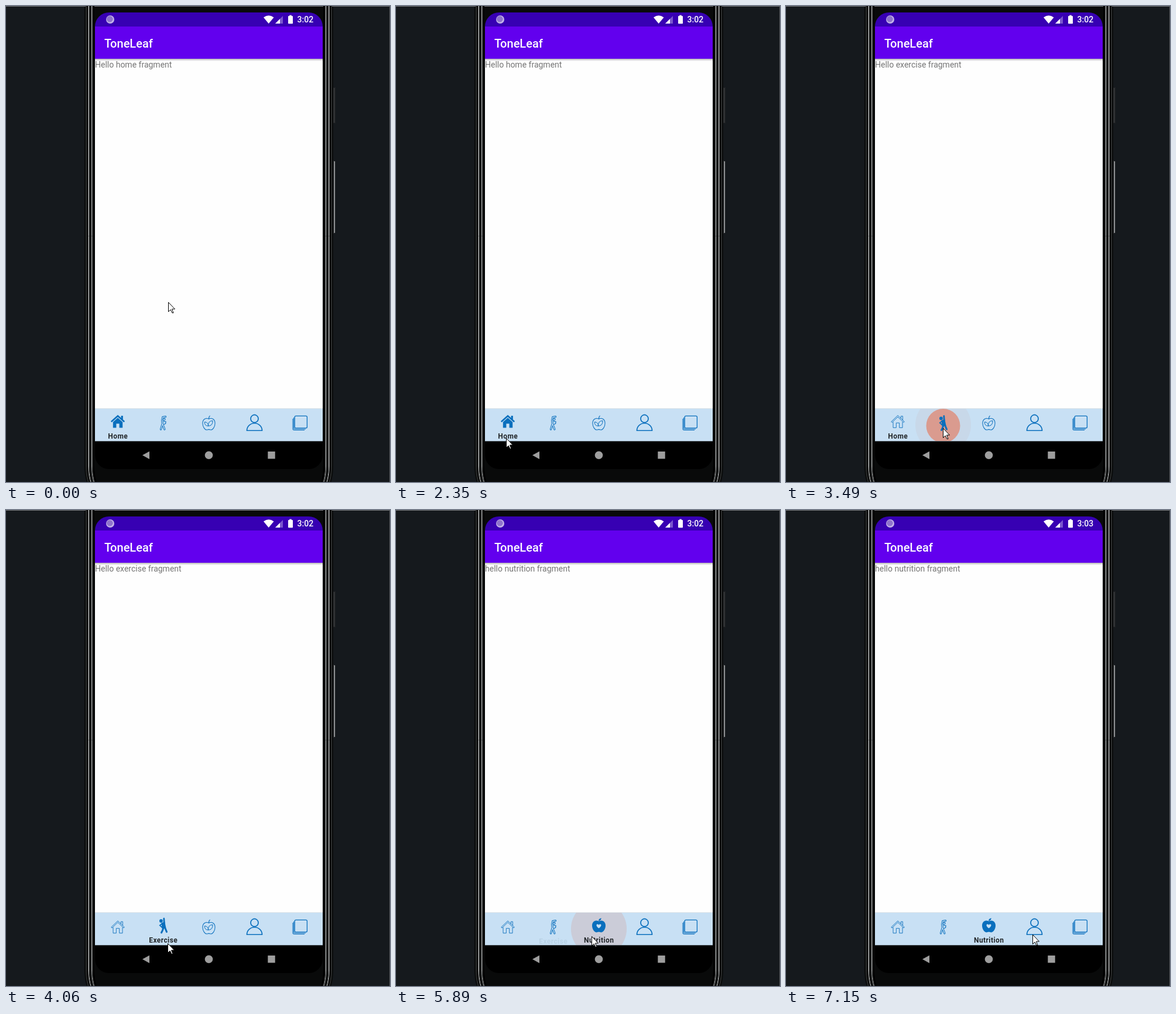
These frames come from a looping animation (656x812 px, 8 s). An HTML page with a canvas:

```html
<!DOCTYPE html>
<html lang="en">
<head>
<meta charset="utf-8">
<title>Bottom navigation</title>
<style>
html, body { margin: 0; width: 100%; height: 100%; overflow: hidden; background: #15191d; }
canvas { display: block; }
</style>
</head>
<body>
<canvas id="stage" width="656" height="812"></canvas>
<script>
const ctx = document.getElementById('stage').getContext('2d');
const LOOP = 8000;
const BLUE = '#0a6fbd', BAR = '#c8e0f4';
const TABS = [
  { x: 191, label: 'Home', text: 'Hello home fragment' },
  { x: 268.5, label: 'Exercise', text: 'Hello exercise fragment' },
  { x: 346.5, label: 'Nutrition', text: 'hello nutrition fragment' }
];
const CLICKS = [3490, 5740];
const CLOCK_TICK = 6170;

// Pointer moves: start, end, number of steps, first gap, path
const MOVES = [
  [540, 1340, 6, 160, [[271, 541], [205, 450], [167, 300], [172, 170], [200, 110], [226, 90]]],
  [1630, 1930, 3, 150, [[222, 260], [196, 600], [186, 737]]],
  [2350, 3210, 7, 120, [[188, 737], [268, 720]]],
  [3490, 4060, 5, 120, [[268, 720], [268, 720], [268, 723], [272, 732], [276, 739]]],
  [4920, 5460, 5, 140, [[282, 738], [334, 727]]],
  [5740, 6450, 6, 150, [[334, 727], [334, 727], [350, 730], [378, 736], [398, 742], [409, 744]]],
  [7030, 7150, 2, 120, [[414, 734], [421, 724]]]
];

function along(path, p) {
  const s = p * (path.length - 1);
  const i = Math.min(Math.floor(s), path.length - 2);
  const f = s - i;
  return [0, 1].map(k => Math.round(path[i][k] + (path[i + 1][k] - path[i][k]) * f));
}

function pointerAt(t) {
  let pos = [277, 505];
  for (const [start, end, n, gap, path] of MOVES) {
    if (t < start) break;
    const rest = (end - start - gap) / Math.max(1, n - 2);
    let k = 0;
    if (t >= start + gap) k = Math.min(n - 1, 1 + Math.floor((t - start - gap) / rest + 1e-6));
    pos = along(path, k / (n - 1));
  }
  return pos;
}

function rect(x, y, w, h, color) {
  ctx.fillStyle = color;
  ctx.fillRect(x, y, w, h);
}

function disc(x, y, r, color) {
  ctx.fillStyle = color;
  ctx.beginPath();
  ctx.arc(x, y, r, 0, 7);
  ctx.fill();
}

function poly(points, color) {
  ctx.fillStyle = color;
  ctx.beginPath();
  points.forEach(([x, y]) => ctx.lineTo(x, y));
  ctx.closePath();
  ctx.fill();
}

function stroke(d, color, width) {
  ctx.strokeStyle = color;
  ctx.lineWidth = width;
  ctx.stroke(new Path2D(d));
}

function fill(d, color) {
  ctx.fillStyle = color;
  ctx.fill(new Path2D(d));
}

function text(str, x, y, font, color, align = 'left', spacing = 0) {
  ctx.font = font + ' Roboto, sans-serif';
  ctx.fillStyle = color;
  ctx.textAlign = align;
  ctx.letterSpacing = spacing + 'px';
  ctx.fillText(str, x, y);
}

function at(x, y, draw) {
  ctx.save();
  ctx.translate(x, y);
  draw();
  ctx.restore();
}

function edge(x, color, width) {
  const side = `M${x} 0V785Q${x} 802 ${x + 5} 816`;
  stroke(side, color, width);
  ctx.save();
  ctx.translate(693, 0);
  ctx.scale(-1, 1);
  stroke(side, color, width);
  ctx.restore();
}

function drawPhone() {
  rect(0, 0, 656, 812, '#15191d');
  rect(0, 0, 656, 1, '#77797c');
  rect(655, 0, 1, 812, '#54575a');
  fill('M134 1H559V785Q559 802 554 816H139Q134 802 134 785Z', '#090a0a');
  edge(137, '#2b2d2d', 2);
  edge(139, '#050505', 2);
  edge(140.5, '#565858', 1);
  edge(141.5, '#cbcdcd', 1);
  edge(143.5, '#0c0d0d', 3);
  edge(145.5, '#363838', 1);
  edge(146.5, '#8e9090', 1);
  edge(147.5, '#585a5a', 1);
  edge(149.5, '#000', 3);
  rect(559, 139, 4, 61, '#222426');
  rect(560, 140, 1, 59, '#414345');
  rect(559, 264, 3, 124, '#2c2e30');
  rect(560, 265, 1, 122, '#5c5e60');
  rect(561, 265, 1, 122, '#b9bbbc');
}

function drawScreen(t, tab) {
  ctx.save();
  ctx.beginPath();
  ctx.roundRect(152, 11, 389, 779, 24);
  ctx.clip();
  rect(152, 11, 389, 24, '#3700b3');
  rect(152, 35, 389, 55, '#6200ee');
  rect(152, 90, 389, 597, '#fefefe');
  const shade = ctx.createLinearGradient(0, 90, 0, 94);
  shade.addColorStop(0, '#b4b4b4');
  shade.addColorStop(1, '#fefefe');
  rect(152, 90, 389, 4, shade);
  rect(152, 686, 389, 1, '#e2e6e9');
  rect(152, 742, 389, 48, '#000');
  rect(152, 687, 389, 55.4, BAR);
  drawStatus(t);
  text('ToneLeaf', 168, 71, '500 20px', '#fff');
  text(TABS[tab].text, 152, 105, '14px', '#757575');
  poly([[233, 766.3], [245, 759.8], [245, 773]], '#9e9e9e');
  disc(346.5, 766.3, 6.8, '#9e9e9e');
  rect(447.3, 760, 12.4, 12.4, '#9e9e9e');
  ctx.restore();
}

function drawStatus(t) {
  disc(178, 23, 7, '#c3b3e8');
  disc(177.3, 22.3, 5.3, '#8f74cc');
  fill('M440 19.6Q448.7 12.8 457.5 19.6L448.7 30Z', '#fff');
  poly([[460, 30], [473, 17], [473, 30]], '#7b58cd');
  poly([[460, 30], [468, 22], [468, 30]], '#fff');
  rect(484.2, 15.6, 3.6, 3, '#fff');
  ctx.fillStyle = '#fff';
  ctx.beginPath();
  ctx.roundRect(482, 17, 8, 13.3, 1);
  ctx.fill();
  text(t < CLOCK_TICK ? '3:02' : '3:03', 497.5, 28, '500 14px', '#fff');
}

function homeIcon(on) {
  if (on) {
    stroke('M-11.2 .2L0 -9.8L11.2 .2', BLUE, 2.6);
    rect(5.6, -10, 3.2, 6.5, BLUE);
    fill('M-8.2 .7L0 -6.6L8.2 .7V10.5H2.6V3.5H-2.6V10.5H-8.2Z', BLUE);
    return;
  }
  stroke('M-11.3 .2L0 -10.6L11.3 .2L10 1.5L0 -8L-10 1.5Z', BLUE, .9);
  stroke('M5.4 -5.5V-9.3H8.4V-2.8M-8 .5V10.3H-2.7V2.2H2.7V10.3H8V.5', BLUE, .9);
}

function exerciseIcon(on) {
  ctx.lineCap = 'round';
  if (on) {
    disc(-3.6, -8, 2.9, BLUE);
    stroke('M1.3 -12L1.8 -4', BLUE, 2.8);
    stroke('M-2 -3.4L-5.6 -.4L-2 3', BLUE, 1.9);
    fill('M-3 -4.6L2.7 -6.8L5 4.5L-1.8 5.4Z', BLUE);
    stroke('M.2 4.5L-1.2 8.5L-3 12', BLUE, 3);
    stroke('M3.3 4L6 10.6', BLUE, 3);
    return;
  }
  const limbs = 'M4 -10.8L-.6 -10L-1.8 -5L-1.2 1L-4 10.6M-1 1.5L2.4 10.6';
  stroke(limbs, BLUE, 3.2);
  stroke(limbs, BAR, 1.3);
  stroke('M3.4 -6.4A1.9 1.9 0 1 1 3.4 -6.45M.8 -2.8L4.6 -2.4L4.2 .8L1.2 2.2', BLUE, 1.1);
}

function appleIcon(on) {
  const body = 'M0 -7.5C-4 -10 -11.5 -8.5 -11.5 0C-11.5 6 -7.5 11.5 -4 11.5C-2 11.5 -1.5 10.8 0 10.8C1.5 10.8 2 11.5 4 11.5C7.5 11.5 11.5 6 11.5 0C11.5 -8.5 4 -10 0 -7.5Z';
  if (on) {
    fill(body, BLUE);
    fill('M-.5 -8Q-.3 -12.4 4.2 -12.8Q4 -8.5 -.5 -8Z', BLUE);
    fill('M0 4.6C-5.2 1 -4.6 -2.4 -2.3 -2.4C-.9 -2.4 -.3 -1.5 0 -.8C.3 -1.5 .9 -2.4 2.3 -2.4C4.6 -2.4 5.2 1 0 4.6Z', BAR);
    return;
  }
  at(0, .4, () => {
    ctx.scale(.92, .97);
    stroke(body, BLUE, 1.1);
  });
  stroke('M0 -7.5Q-.2 -10.8 2 -12.6', BLUE, 1.2);
  stroke('M-1 5Q-8 4.5 -7 -2Q-.5 -1 -1 5ZM-1 5Q-1.5 -3.8 6.5 -4Q7 4.5 -1 5Z', BLUE, 1);
}

const ICONS = [homeIcon, exerciseIcon, appleIcon];

function drawFixedIcons() {
  at(424.5, 711, () => {
    stroke('M6.5 -7A6.5 6.5 0 1 1 6.5 -7.01', BLUE, 1.6);
    stroke('M-13 13.3A13 12.6 0 0 1 13 13.3Z', BLUE, 1.6);
  });
  at(502, 711, () => {
    ctx.strokeStyle = BLUE;
    ctx.lineWidth = 1.3;
    ctx.beginPath();
    ctx.roundRect(-8.8, -11.7, 21.2, 20.6, 2);
    ctx.stroke();
    stroke('M-10.4 -9V9Q-10.4 10.7 -8.5 10.7H10M-12 -7V10Q-12 12.5 -9.5 12.5H8', BLUE, 1.1);
  });
}

function label(tab, dy, color) {
  text(TABS[tab].label, TABS[tab].x + .2, 737.5 + dy, '700 12px', color, 'center', .4);
}

function drawRipple(x, phase) {
  ctx.save();
  ctx.beginPath();
  ctx.rect(152, 687, 389, 55);
  ctx.clip();
  disc(x, 714.5, 47.6, phase ? '#cbccd8' : '#c8d8e9');
  if (!phase) disc(x, 716, 29, '#da9b8f');
  ctx.restore();
}

function drawTabs(t, tab) {
  const since = tab ? t - CLICKS[tab - 1] : Infinity;
  const phase = since < (tab === 1 ? 120 : 150) ? 0 : since < 285 ? 1 : 2;
  const raised = phase ? tab : tab - 1;
  if (phase < 2) drawRipple(TABS[tab].x, phase);
  if (phase === 1) label(tab - 1, 2, '#b9d2e5');
  label(raised, 0, '#222629');
  ICONS.forEach((icon, i) => {
    at(TABS[i].x, i === raised ? 709 : 711.5, () => icon(i === tab));
  });
  drawFixedIcons();
}

function drawPointer(t) {
  const [x, y] = pointerAt(t);
  at(x + .5, y + .5, () => {
    const arrow = 'M0 0V16L3.6 12.5L6.4 18H8.5L6 11.5H11Z';
    fill(arrow, '#fff');
    stroke(arrow, '#000', 1);
  });
}

function frame(now) {
  const t = now % LOOP;
  const tab = CLICKS.filter(c => t >= c).length;
  drawPhone();
  drawScreen(t, tab);
  drawTabs(t, tab);
  drawPointer(t);
  requestAnimationFrame(frame);
}
requestAnimationFrame(frame);
</script>
</body>
</html>
```
